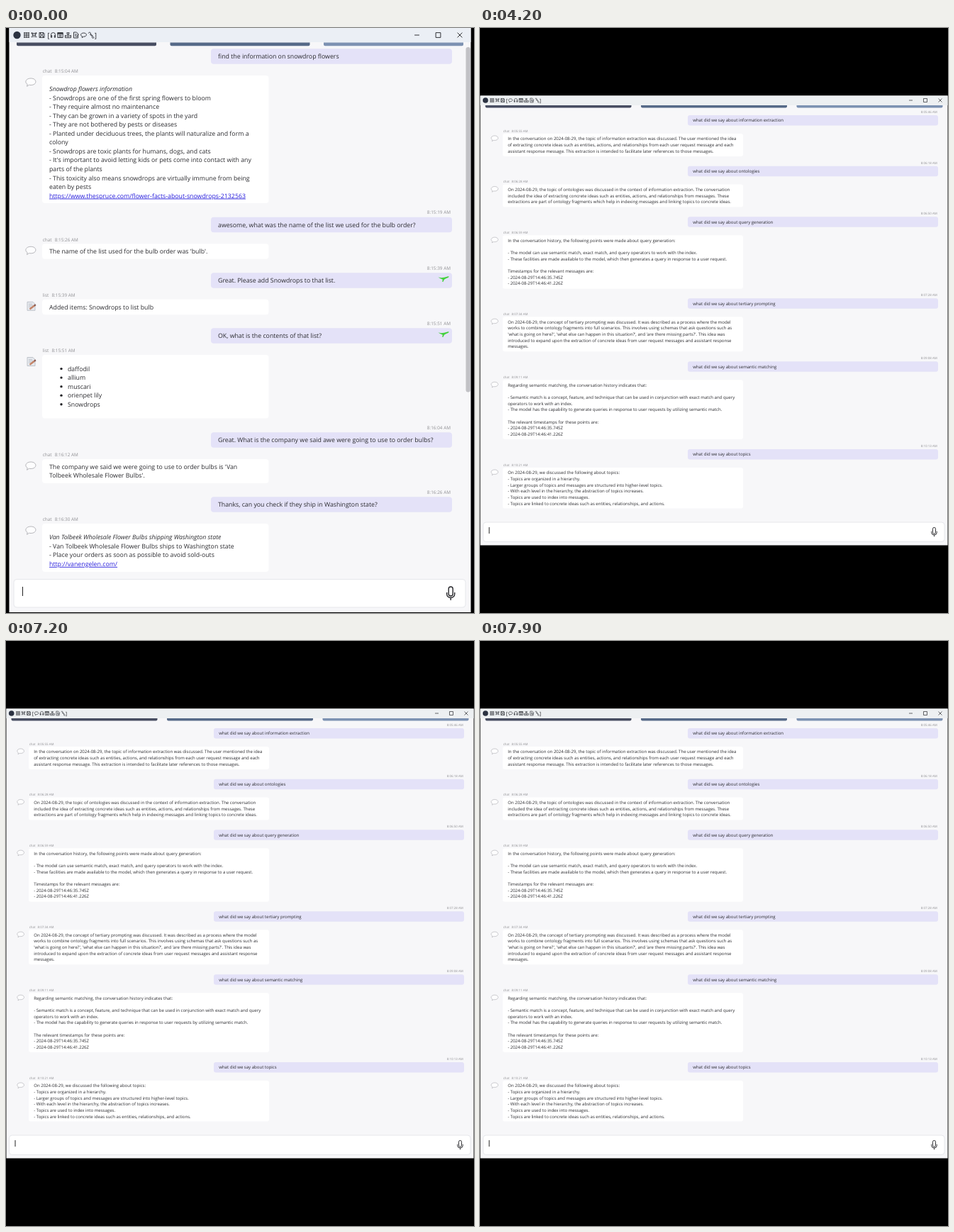
Animation, 660 px wide and 825 px high, one loop 8 s. Source, as an HTML page:

```html
<!DOCTYPE html>
<html lang="en">
<head>
<meta charset="utf-8">
<title>Chat history</title>
<style>
  html, body { margin: 0; width: 100%; height: 100%; overflow: hidden; background: #000; }
  svg { position: absolute; left: 0; top: 0; width: 660px; height: 825px; }
  text { font-family: "Open Sans", "Noto Sans", sans-serif; fill: #2c2c30; text-rendering: geometricPrecision; }
  .time { fill: #909094; }
  .em { font-style: italic; }
  .link { fill: #2a20dc; text-decoration: underline; }
</style>
</head>
<body>
<script>
const NS = 'http://www.w3.org/2000/svg';
const LOOP = 8000, CUT = 4000;

function add(parent, tag, attrs, content) {
  const el = document.createElementNS(NS, tag);
  for (const k in attrs) el.setAttribute(k, attrs[k]);
  if (content !== undefined) el.textContent = content;
  parent.append(el);
  return el;
}
const box = (p, x, y, w, h, fill, rx = 0, more = {}) =>
  add(p, 'rect', { x, y, width: w, height: h, fill, rx, ...more });
const stroke = (p, d, color, width, more = {}) =>
  add(p, 'path', { d, fill: 'none', stroke: color, 'stroke-width': width, ...more });
// y is the middle of the capitals
const label = (p, x, y, size, str, cls = '', anchor = 'start') =>
  add(p, 'text', { x, y: y + size * 0.357, 'font-size': size, class: cls, 'text-anchor': anchor }, str);
const place = (p, x, y, s) => add(p, 'g', { transform: `translate(${x} ${y}) scale(${s})` });

// title bar glyphs, each in a box of -4..4
const glyphs = {
  grid: 'M-4 -3H4M-4 0H4M-4 3H4M-3 -4V4M0 -4V4M3 -4V4',
  calc: 'M-4 -2.5H4M-3 0H3M-3 -4L-1 3M3 -4L1 3M-4 2.5H-2M2 2.5H4',
  disk: 'M-3.5 -3.5H2.5L3.5 -2.5V3.5H-3.5ZM-2 -3.5V-1H2V-3.5M-2 3.5V1H2V3.5',
  phones: 'M-3 3V-.5A3 3 0 0 1 3 -.5V3M-3 .5H-1.8V3.3H-3ZM3 .5H1.8V3.3H3Z',
  calendar: 'M-3.7 -3.5H3.7V3.5H-3.7ZM-3.7 -2.6H3.7M-3.7 -1.6H3.7M-2 .2H2M-2 2H2',
  inbox: 'M-4 0V3.7H4V0M-4 1H-1.5L-1 2H1L1.5 1H4M0 -4V0M-2 -1.5L0 .5L2 -1.5M-2.5 -3H2.5',
  note: 'M-3 -4H1L3 -2V4H-3ZM-1.5 -1H1.5M-1.5 1H1M0 3L4 -.5',
  bubble: 'M0 -3C5.2 -3 5.2 2.2 0 2.2L-2.3 3.6L-2 1.8C-5.2 .8 -4.4 -3 0 -3Z',
  wrench: 'M-3.7 -2.5A1.6 1.6 0 1 1 -1.5 -.8L2 2.2A1.2 1.2 0 1 0 3.5 2.3M-1 -1.7L2.8 1.4'
};

function titleIcons(p, y, s, items) {
  for (const [name, x] of items) {
    if (glyphs[name]) stroke(place(p, x, y, s), glyphs[name], '#303238', 0.95);
    else label(p, x, y, 10 * s, name, '', 'middle');
  }
}

function controls(p, xs, y, r) {
  const [a, b, c] = xs;
  stroke(p, `M${a - r} ${y}H${a + r}M${b - r} ${y - r}H${b + r}V${y + r}H${b - r}Z` +
    `M${c - r} ${y - r}L${c + r} ${y + r}M${c + r} ${y - r}L${c - r} ${y + r}`, '#26282c', r * 0.28);
}

function mic(p, x, y, s) {
  const g = place(p, x, y, s);
  stroke(g, 'M-3 -6A3 3 0 0 1 3 -6V1A3 3 0 0 1 -3 1ZM-5.5 -1V1.5A5.5 5 0 0 0 5.5 1.5V-1M0 6.5V10',
    '#26262a', 1.4);
}

function chatIcon(p, x, y, s) {
  add(place(p, x, y, s), 'path', {
    d: 'M0 -5.5C9.2 -5.5 9.2 4 0 4C-1 4 -1.6 3.9 -2.4 3.7L-5.4 5.8L-4.8 2.8C-9.2 .4 -7.2 -5.5 0 -5.5Z',
    fill: '#fdfdfe', stroke: '#a5a5aa', 'stroke-width': 0.8
  });
}

function listIcon(p, x, y) {
  const g = place(p, x, y, 1);
  add(g, 'path', { d: 'M-6 -6H2L5 -3V6H-6Z', fill: '#e6e9ee', stroke: '#b4b9c2', 'stroke-width': 0.8 });
  stroke(g, 'M-4 -3H1M-4 -1H2M-4 1H0', '#b0b5be', 0.7);
  stroke(g, 'M-2.5 4.2L4 -.8', '#c48468', 2.4);
  stroke(g, 'M3.8 -.6L5.8 -2.2', '#8a5a50', 2.4);
}

function lizard(p, x, y) {
  add(place(p, x, y, 1), 'path', {
    d: 'M-7.5 -2L-3 -1.2L1 -1.8L7.5 -3.4L7 -1.8L3.5 -.2L1 1.2L-.6 4.4L-1.8 4.2L-1.2 1.2L-4 0Z',
    fill: '#43d13c'
  });
}

// one chat window; c holds its measures
function chat(svg, c) {
  for (const m of c.messages) {
    if (m.ask) {
      box(svg, c.askX, m.y - c.askH / 2, c.askW, c.askH, '#e4e2f8', c.round);
      label(svg, c.askX + c.padX, m.y, c.size, m.ask);
      label(svg, c.askX + c.askW - c.timeInset, m.y - c.timeUp, c.small, m.at, 'time', 'end');
      if (m.lizard) lizard(svg, 617, m.y - 2.5);
      continue;
    }
    const name = m.list ? 'list' : 'chat';
    const head = label(svg, c.sayX + 0.7, m.y - c.nameUp, c.small, name, 'time');
    add(head, 'tspan', { dx: c.small * 0.65 }, m.at);
    box(svg, c.sayX, m.y, c.sayW, m.h, '#fff', c.round);
    if (m.list) listIcon(svg, c.iconX + 1, m.y + c.iconY);
    else chatIcon(svg, c.iconX, m.y + c.iconY, c.scale);
    m.say.forEach((line, i) => {
      if (!line) return;
      const y = m.y + (m.first || c.first) + i * c.pitch;
      const cls = line[0] === '*' ? 'em' : line.startsWith('http') ? 'link' : '';
      let x = c.sayX + c.padX;
      if (m.bullets) {
        add(svg, 'circle', { cx: 78, cy: y, r: 1.7, fill: '#222226' });
        x = 87;
      }
      label(svg, x, y, c.size, line.replace('*', ''), cls);
    });
  }
}

function tabs(svg, xs, y, w, h) {
  ['#484e62', '#566a88', '#7d92b2'].forEach((fill, i) =>
    add(svg, 'path', { d: `M${xs[i]} ${y}h${w}v${h - 2}q0 2 -2 2h${4 - w}q-2 0 -2 -2z`, fill }));
}

function input(svg, x, y, w, h, caret, caretTop, caretH) {
  box(svg, x, y, w, h, '#fff', 4, { stroke: '#e6e7eb', 'stroke-width': 1 });
  box(svg, caret, caretTop, 1, caretH, '#222');
}

function makeStage() {
  const svg = add(document.body, 'svg', { viewBox: '0 0 660 825' });
  box(svg, 0, 0, 660, 825, '#000');
  return svg;
}

const garden = {
  size: 8.78, small: 6.4, pitch: 12.52, scale: 1, round: 4,
  askX: 289, askW: 340, askH: 21.5, padX: 10, timeInset: 2, timeUp: 17.5,
  sayX: 51, sayW: 319.5, nameUp: 6, iconX: 35, iconY: 9.5, first: 10.7,
  messages: [
    { ask: 'find the information on snowdrop flowers', at: '', y: 40 },
    { at: '8:15:04 AM', y: 67, h: 180, first: 19.2, say: [
      '*Snowdrop flowers information',
      '- Snowdrops are one of the first spring flowers to bloom',
      '- They require almost no maintenance',
      '- They can be grown in a variety of spots in the yard',
      '- They are not bothered by pests or diseases',
      '- Planted under deciduous trees, the plants will naturalize and form a',
      'colony',
      '- Snowdrops are toxic plants for humans, dogs, and cats',
      "- It's important to avoid letting kids or pets come into contact with any",
      'parts of the plants',
      '- This toxicity also means snowdrops are virtually immune from being',
      'eaten by pests',
      'https://www.thespruce.com/flower-facts-about-snowdrops-2132563'] },
    { ask: 'awesome, what was the name of the list we used for the bulb order?', at: '8:15:19 AM', y: 277.5 },
    { at: '8:15:26 AM', y: 304.3, h: 21.5, say: ["The name of the list used for the bulb order was 'bulb'."] },
    { ask: 'Great. Please add Snowdrops to that list.', at: '8:15:39 AM', y: 356, lizard: true },
    { list: true, at: '8:15:39 AM', y: 382.8, h: 21.5, say: ['Added items: Snowdrops to list bulb'] },
    { ask: 'OK, what is the contents of that list?', at: '8:15:51 AM', y: 434, lizard: true },
    { list: true, bullets: true, at: '8:15:51 AM', y: 461, h: 89.5, first: 19.6,
      say: ['daffodil', 'allium', 'muscari', 'orienpet lily', 'Snowdrops'] },
    { ask: 'Great. What is the company we said awe were going to use to order bulbs?', at: '8:16:04 AM', y: 581 },
    { at: '8:16:12 AM', y: 608, h: 34, say: [
      "The company we said we were going to use to order bulbs is 'Van",
      "Tolbeek Wholesale Flower Bulbs'."] },
    { ask: 'Thanks, can you check if they ship in Washington state?', at: '8:16:26 AM', y: 672 },
    { at: '8:16:30 AM', y: 699, h: 68, first: 19.2, say: [
      '*Van Tolbeek Wholesale Flower Bulbs shipping Washington state',
      '- Van Tolbeek Wholesale Flower Bulbs ships to Washington state',
      '- Place your orders as soon as possible to avoid sold-outs',
      'http://vanengelen.com/'] }
  ]
};

const memory = {
  size: 6.05, small: 4.45, pitch: 8.68, scale: 0.69, round: 3,
  askX: 293, askW: 353, askH: 14.6, padX: 7.2, timeInset: 1.2, timeUp: 12,
  sayX: 32, sayW: 339, nameUp: 4, iconX: 20.7, iconY: 6.7, first: 7.2,
  messages: [
    { ask: 'what did we say about information extraction', at: '8:05:46 AM', y: 130.2 },
    { at: '8:05:55 AM', y: 149, h: 32, say: [
      'In the conversation on 2024-08-29, the topic of information extraction was discussed. The user mentioned the idea',
      'of extracting concrete ideas such as entities, actions, and relationships from each user request message and each',
      'assistant response message. This extraction is intended to facilitate later references to those messages.'] },
    { ask: 'what did we say about ontologies', at: '8:06:18 AM', y: 202 },
    { at: '8:06:28 AM', y: 220.6, h: 32, say: [
      'On 2024-08-29, the topic of ontologies was discussed in the context of information extraction. The conversation',
      'included the idea of extracting concrete ideas such as entities, actions, and relationships from messages. These',
      'extractions are part of ontology fragments which help in indexing messages and linking topics to concrete ideas.'] },
    { ask: 'what did we say about query generation', at: '8:06:50 AM', y: 273.5 },
    { at: '8:06:59 AM', y: 292.2, h: 75.5, say: [
      'In the conversation history, the following points were made about query generation:', '',
      '- The model can use semantic match, exact match, and query operators to work with the index.',
      '- These facilities are made available to the model, which then generates a query in response to a user request.', '',
      'Timestamps for the relevant messages are:',
      '- 2024-08-29T14:46:35.745Z',
      '- 2024-08-29T14:46:41.226Z'] },
    { ask: 'what did we say about tertiary prompting', at: '8:07:28 AM', y: 388.5 },
    { at: '8:07:34 AM', y: 407.2, h: 49, say: [
      'On 2024-08-29, the concept of tertiary prompting was discussed. It was described as a process where the model',
      'works to combine ontology fragments into full scenarios. This involves using schemas that ask questions such as',
      "'what is going on here?', 'what else can happen in this situation?', and 'are there missing parts?'. This idea was",
      'introduced to expand upon the extraction of concrete ideas from user request messages and assistant response',
      'messages.'] },
    { ask: 'what did we say about semantic matching', at: '8:09:08 AM', y: 477.5 },
    { at: '8:09:11 AM', y: 496.3, h: 83.8, say: [
      'Regarding semantic matching, the conversation history indicates that:', '',
      '- Semantic match is a concept, feature, and technique that can be used in conjunction with exact match and query',
      'operators to work with an index.',
      '- The model has the capability to generate queries in response to user requests by utilizing semantic match.', '',
      'The relevant timestamps for these points are:',
      '- 2024-08-29T14:46:35.745Z',
      '- 2024-08-29T14:46:41.226Z'] },
    { ask: 'what did we say about topics', at: '8:10:13 AM', y: 601.2 },
    { at: '8:10:21 AM', y: 620, h: 57.5, say: [
      'On 2024-08-29, we discussed the following about topics:',
      '- Topics are organized in a hierarchy.',
      '- Larger groups of topics and messages are structured into higher-level topics.',
      '- With each level in the hierarchy, the abstraction of topics increases.',
      '- Topics are used to index into messages.',
      '- Topics are linked to concrete ideas such as entities, relationships, and actions.'] }
  ]
};

function drawGarden() {
  const svg = makeStage();
  box(svg, 4.5, 0, 651, 824, '#f7f7f9');
  box(svg, 4.5, 0, 651, 20, '#ebeff5');
  add(svg, 'circle', { cx: 15.5, cy: 10, r: 5.2, fill: '#2b3242' });
  titleIcons(svg, 10, 1, [['grid', 29], ['calc', 39.5], ['disk', 50.5], ['[', 60], ['phones', 66.5],
    ['calendar', 76.5], ['inbox', 87.5], ['note', 98.5], ['bubble', 109.5], ['wrench', 120], [']', 126.5]]);
  controls(svg, [579.5, 609.5, 640], 10, 3.4);
  tabs(svg, [15, 231.5, 448], 20.5, 197, 4.8);
  chat(svg, garden);
  box(svg, 648.5, 27, 6.5, 486.5, '#c2c2c6', 3);
  input(svg, 11, 777.5, 637, 39.5, 23, 788, 13);
  mic(svg, 627.2, 797, 1);
}

function drawMemory() {
  const svg = makeStage();
  box(svg, 0.5, 95.5, 659, 634, '#f7f7f9');
  box(svg, 0.5, 95.5, 659, 13.5, '#edf0f2');
  add(svg, 'circle', { cx: 7.7, cy: 102, r: 3.8, fill: '#2b3242' });
  titleIcons(svg, 102, 0.72, [['grid', 17], ['calc', 24.5], ['disk', 32], ['[', 38], ['bubble', 43],
    ['phones', 50.5], ['calendar', 57.8], ['inbox', 65.3], ['note', 73], ['wrench', 80.5], [']', 85]]);
  controls(svg, [607.5, 628, 649], 102, 2.5);
  tabs(svg, [7.5, 227, 446.5], 109, 206, 3.6);
  chat(svg, memory);
  input(svg, 4.5, 697, 650.5, 27.5, 12.5, 704, 9);
  mic(svg, 640.5, 710.5, 0.68);
  return svg;
}

drawGarden();
drawMemory().animate([
  { opacity: 0, offset: 0, easing: 'step-end' },
  { opacity: 1, offset: CUT / LOOP },
  { opacity: 1, offset: 1 }
], { duration: LOOP, iterations: Infinity });
</script>
</body>
</html>
```
